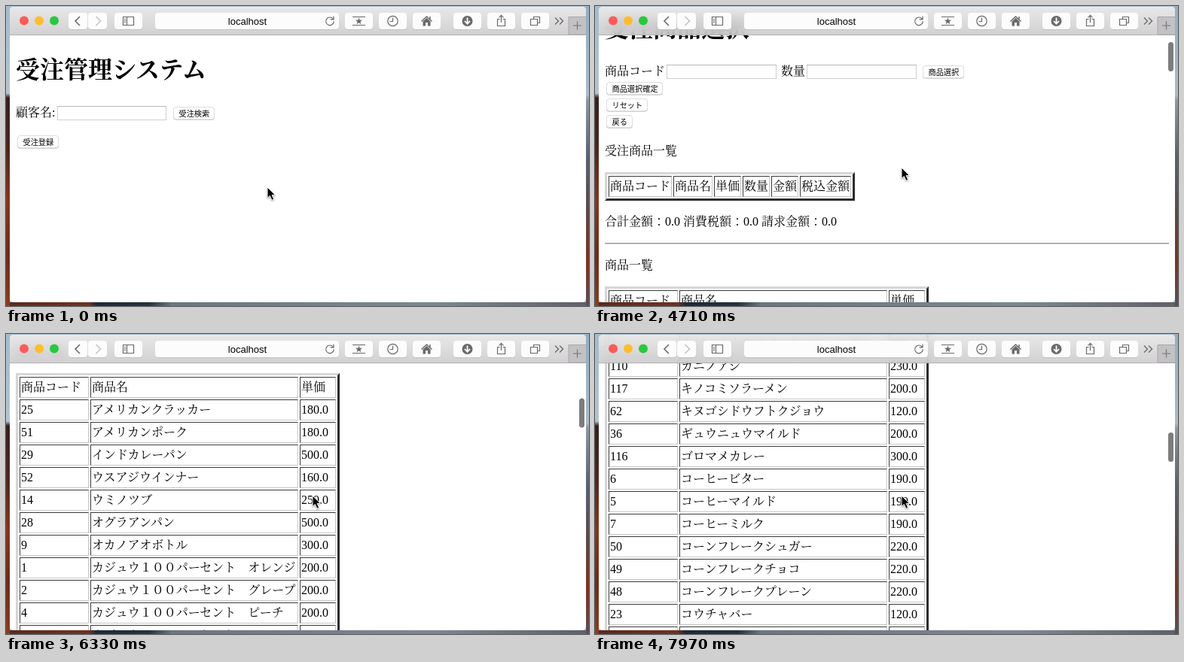
An HTML page that plays this animation: 774x399 px, repeating every 8000 ms.

```html
<!DOCTYPE html>
<html lang="ja">
<head>
<meta charset="utf-8">
<title>受注管理システム</title>
<style>
@property --s { syntax: "<number>"; inherits: true; initial-value: 0; }
html, body { margin: 0; width: 100%; height: 100%; overflow: hidden; }
.stage {
  position: relative; width: 774px; height: 399px; overflow: hidden;
  background:
    linear-gradient(90deg, #5b2a1f, #6d3323 105px, #1e2a38 115px, #27323f 185px, #6b7683 215px, #7d8792 560px, #5d5f68 774px) 5px 394px / 765px 5px no-repeat,
    linear-gradient(#a3bccd, #b4c3cf 116px, #35201f 122px, #4d2620 190px, #84371d 260px, #6a2c1c 330px, #8a3d20 399px) 0 0 / 5px 399px no-repeat,
    linear-gradient(#93adc1, #a9bac8 118px, #8d96a1 126px, #566274 200px, #5c4745 280px, #7c3222 340px, #59505a 399px) 770px 0 / 4px 399px no-repeat,
    #a8bfcf;
}
.win { position: absolute; left: 5px; top: 1px; width: 765px; height: 393px; overflow: hidden; border-radius: 5px; background: #fff; }
.win > svg { position: absolute; left: -5px; top: -1px; }
.bar {
  position: absolute; left: 0; top: 0; width: 100%; height: 37px; border-bottom: 1px solid #b3b1b3;
  background: linear-gradient(rgba(229, 228, 229, .86), rgba(203, 201, 203, .86));
  backdrop-filter: blur(7px);
}
svg { display: block; }
text { white-space: pre; }
.page { font: 16px "Liberation Serif", "Noto Serif CJK JP", "Noto Sans CJK JP", serif; }
.page .h { font-size: 32px; font-weight: 700; }
.page .b { font: 500 10.2px "Noto Sans CJK JP", sans-serif; }
.url { font: 13px "Liberation Sans", Arial, sans-serif; }
.icon { fill: none; stroke: #6a6a6a; stroke-width: 1.2; }
.solid { fill: #6a6a6a; stroke: none; }

.stage, .p1, .p2, .cursor, .arrow, .beam { animation: 8s step-end infinite; }
.stage { animation-name: scroll; }
.p1 { animation-name: first; }
.p2 { animation-name: second; }
.scroll { transform: translateY(calc(var(--s) * -1px)); }
.thumb { transform: translateY(calc(var(--s) * .117px)); opacity: var(--s); }
.cursor { position: absolute; left: 0; top: 0; overflow: visible; animation-name: move; }
.arrow { animation-name: arrow; }
.beam { animation-name: beam; }

@keyframes first { 0% { opacity: 1 } 29.5%, 100% { opacity: 0 } }
@keyframes second { 0% { opacity: 0 } 29.5%, 100% { opacity: 1 } }
@keyframes arrow { 0% { opacity: 1 } 38.625% { opacity: 0 } 46%, 100% { opacity: 1 } }
@keyframes beam { 0% { opacity: 0 } 38.625% { opacity: 1 } 46%, 100% { opacity: 0 } }
@keyframes move {
  0% { transform: translate(347px, 241px) }
  11.125% { transform: translate(341px, 264px) }
  13% { transform: translate(312px, 279px) }
  14.875% { transform: translate(240px, 266px) }
  16.625% { transform: translate(160px, 234px) }
  18.5% { transform: translate(98px, 204px) }
  20.25% { transform: translate(66px, 188px) }
  22.125% { transform: translate(56px, 182px) }
  33.125% { transform: translate(66px, 178px) }
  35% { transform: translate(86px, 169px) }
  36.75% { transform: translate(110px, 158px) }
  38.625% { transform: translate(128px, 151px) }
  40.5% { transform: translate(152px, 146px) }
  42.375% { transform: translate(230px, 136px) }
  44.125% { transform: translate(345px, 137px) }
  46% { transform: translate(440px, 142px) }
  47.875% { transform: translate(470px, 164px) }
  49.75% { transform: translate(436px, 198px) }
  51.5%, 100% { transform: translate(407px, 215px) }
}
@keyframes scroll {
  0% { --s: 0 }
  57% { --s: 14 }
  58.875% { --s: 55 }
  60.75% { --s: 98 }
  62.5% { --s: 135 }
  64.25% { --s: 164 }
  66.125% { --s: 185 }
  68% { --s: 196 }
  69.875% { --s: 200 }
  75.375% { --s: 240 }
  77.25% { --s: 316 }
  79.125% { --s: 376 }
  81% { --s: 423 }
  82.875% { --s: 455 }
  84.75% { --s: 474 }
  86.625% { --s: 484 }
  88.5% { --s: 486 }
  94% { --s: 540 }
  95.875% { --s: 632 }
  97.75% { --s: 708 }
  99.625%, 100% { --s: 764 }
}
</style>
</head>
<body>
<div class="stage">
  <div class="win">
    <svg class="page" width="774" height="399">
      <g class="p1" id="search"></g>
      <g class="p2"><g class="scroll" id="select"></g></g>
      <rect class="thumb" x="761" y="41.5" width="7" height="39" rx="3.5" fill="#7d7d7d"/>
    </svg>
    <div class="bar"></div>
    <svg width="774" height="399">
      <circle cx="24" cy="19.500" r="6" fill="#fc5b57"/>
      <circle cx="44" cy="19.500" r="6" fill="#fdbd2e"/>
      <circle cx="64" cy="19.500" r="6" fill="#28c840"/>
      <g id="keys"></g>
      <path d="M747 38V14.500H771V38z" fill="#c3c1c3" stroke="#a9a7a9"/>
      <text class="url" x="320.500" y="24.500" text-anchor="middle">localhost</text>
      <g class="icon">
        <path d="M98 14l-6 6 6 6" stroke-width="1.600"/>
        <path d="M119.500 14l6 6-6 6" stroke="#c4c4c4" stroke-width="1.600"/>
        <path d="M155.500 14.500h14v11h-14zM160.500 14.500v11M157 17.500h2M157 19.500h2M157 21.500h2"/>
        <path d="M434.500 17.500a5.300 5.300 0 1 0 .8 2.700M435 13.500v4.300h-4.300"/>
        <path d="M460 14.500h17M460 25.500h17"/>
        <path class="solid" d="M468.500 15.500l1.200 3.200 3.400.1-2.700 2.100 1 3.300-2.900-1.900-2.900 1.900 1-3.300-2.700-2.100 3.400-.1z"/>
        <circle cx="513.500" cy="20" r="6.700"/>
        <path d="M513.500 15.500V20.500H509.500"/>
        <path d="M551.500 20.500l7-6.500 7 6.500M563 17.500v-3.500" stroke-width="1.500"/>
        <path class="solid" d="M553.500 20.500l5-4.700 5 4.700V26.500h-3.500v-4.500h-3v4.500h-3.500z"/>
        <circle class="solid" cx="612.500" cy="20" r="7"/>
        <path d="M612.500 15.500v7M609 20l3.500 3.700 3.500-3.700" stroke="#fff" stroke-width="1.800"/>
        <path d="M655.500 17.500h-3v9h10v-9h-3M657.500 22V12.500M654.500 15.300l3-3 3 3"/>
        <path d="M700.500 17.500v-3h8v8h-3M696.500 17.500h9v8h-9z"/>
        <path d="M729 15.500l4.500 4.500-4.500 4.500M735 15.500l4.500 4.500-4.500 4.500" stroke-width="1.400"/>
        <path d="M758.500 20.500v11M753 26h11" stroke="#777"/>
      </g>
    </svg>
  </div>
  <svg class="cursor" width="16" height="20">
    <path class="arrow" d="M0 0V14.500L3.300 11.400 6 17.300 8.700 16.100 6.100 10.400H10.600z" stroke="#fff" style="filter: drop-shadow(0 1px 1px #0006)"/>
    <path class="beam" d="M-3 -7.500Q0 -7.500 0 -5V5Q0 7.500-3 7.500M3 -7.500Q0 -7.500 0 -5M0 5Q0 7.500 3 7.500M-1.500 3.500h3" fill="none" stroke="#111" stroke-width="1.200"/>
  </svg>
</div>
<script>
const text = (x, y, s, cls = "") => `<text x="${x}" y="${y}" class="${cls}">${s}</text>`;
const rect = (x, y, w, h, attrs) => `<rect x="${x}" y="${y}" width="${w}" height="${h}" ${attrs}/>`;

const field = (x, w) =>
  rect(x + .5, 133.5, w - 1, 18, 'fill="#fff" stroke="#cfcfcf"') +
  rect(x, 133, w, 1, 'fill="#b8b8b8"');

const button = (x, y, w, label) =>
  rect(x, y + .8, w, 17, 'rx="4" fill="#c9c9c9"') +
  rect(x + .5, y + .5, w - 1, 16, 'rx="3.500" fill="#fff" stroke="#dedede"') +
  text(x + 7.5, y + 12.6, label, "b");

// Bevelled frame: one colour on top and left, another on bottom and right
const bevel = (x, y, w, h, b, light, dark) =>
  rect(x, y, w, h, `fill="${dark}"`) +
  `<path d="M${x} ${y}h${w}l${-b} ${b}H${x + b}V${y + h - b}l${-b} ${b}z" fill="${light}"/>` +
  rect(x + b, y + b, w - 2 * b, h - 2 * b, 'fill="#fff"');

function table(y, widths, rows) {
  const total = widths.reduce((a, w) => a + w + 2, 8);
  let out = bevel(13, y, total, rows.length * 30 + 8, 3, "#d6d6d6", "#2c2c2c");
  rows.forEach((row, r) => {
    let x = 18;
    const top = y + 5 + r * 30;
    row.forEach((cell, c) => {
      out += bevel(x, top, widths[c], 28, 1, "#3a3a3a", "#c6c6c6") + text(x + 2, top + 19, cell);
      x += widths[c] + 2;
    });
  });
  return out;
}

const juice = "カジュウ１００パーセント　";
const goods = `25 アメリカンクラッカー 180
51 アメリカンポーク 180
29 インドカレーパン 500
52 ウスアジウインナー 160
14 ウミノツブ 250
28 オグラアンパン 500
9 オカノアオボトル 300
1 ${juice}オレンジ 200
2 ${juice}グレープ 200
4 ${juice}ピーチ 200
3 ${juice}レモン 200
110 カニノアシ 230
117 キノコミソラーメン 200
62 キヌゴシドウフトクジョウ 120
36 ギュウニュウマイルド 200
116 ゴロマメカレー 300
6 コーヒービター 190
5 コーヒーマイルド 190
7 コーヒーミルク 190
50 コーンフレークシュガー 220
49 コーンフレークチョコ 220
48 コーンフレークプレーン 220
23 コウチャバー 120
24 コウチャ 120`.split("\n").map(line => {
  const [code, name, price] = line.split(" ");
  return [code, name, price + ".0"];
});

search.innerHTML =
  text(13, 96, "受注管理システム", "h") +
  text(13, 147, "顧客名:") + field(68, 145) +
  button(222, 134, 55, "受注検索") + button(15, 172, 55, "受注登録");

select.innerHTML =
  text(13, 96, "受注商品選択", "h") +
  text(13, 147, "商品コード") + field(95, 146) +
  text(247, 147, "数量") + field(281, 146) +
  button(435, 134, 55, "商品選択") + button(15, 156, 75, "商品選択確定") +
  button(15, 178, 55, "リセット") + button(15, 200, 35, "戻る") +
  text(13, 253, "受注商品一覧") +
  table(276, [84, 52, 36, 36, 36, 68], [["商品コード", "商品名", "単価", "数量", "金額", "税込金額"]]) +
  text(13, 347, "合計金額：0.0 消費税額：0.0 請求金額：0.0") +
  rect(13, 370, 749, 1, 'fill="#8f8f8f"') + rect(13, 371, 749, 1, 'fill="#d5d5d5"') +
  text(13, 405, "商品一覧") +
  table(428, [92, 276, 48], [["商品コード", "商品名", "単価"], ...goods]);

keys.innerHTML = [[83, 25], [109, 25], [144, 37], [198, 244], [450, 37], [495, 37], [540, 37], [594, 37], [639, 37], [684, 37]]
  .map(([x, w]) => rect(x, 9.8, w, 22, 'rx="4" fill="#b9b7b9"') + rect(x, 9, w, 22, 'rx="4" fill="#fcfcfc"')).join("");
</script>
</body>
</html>
```
